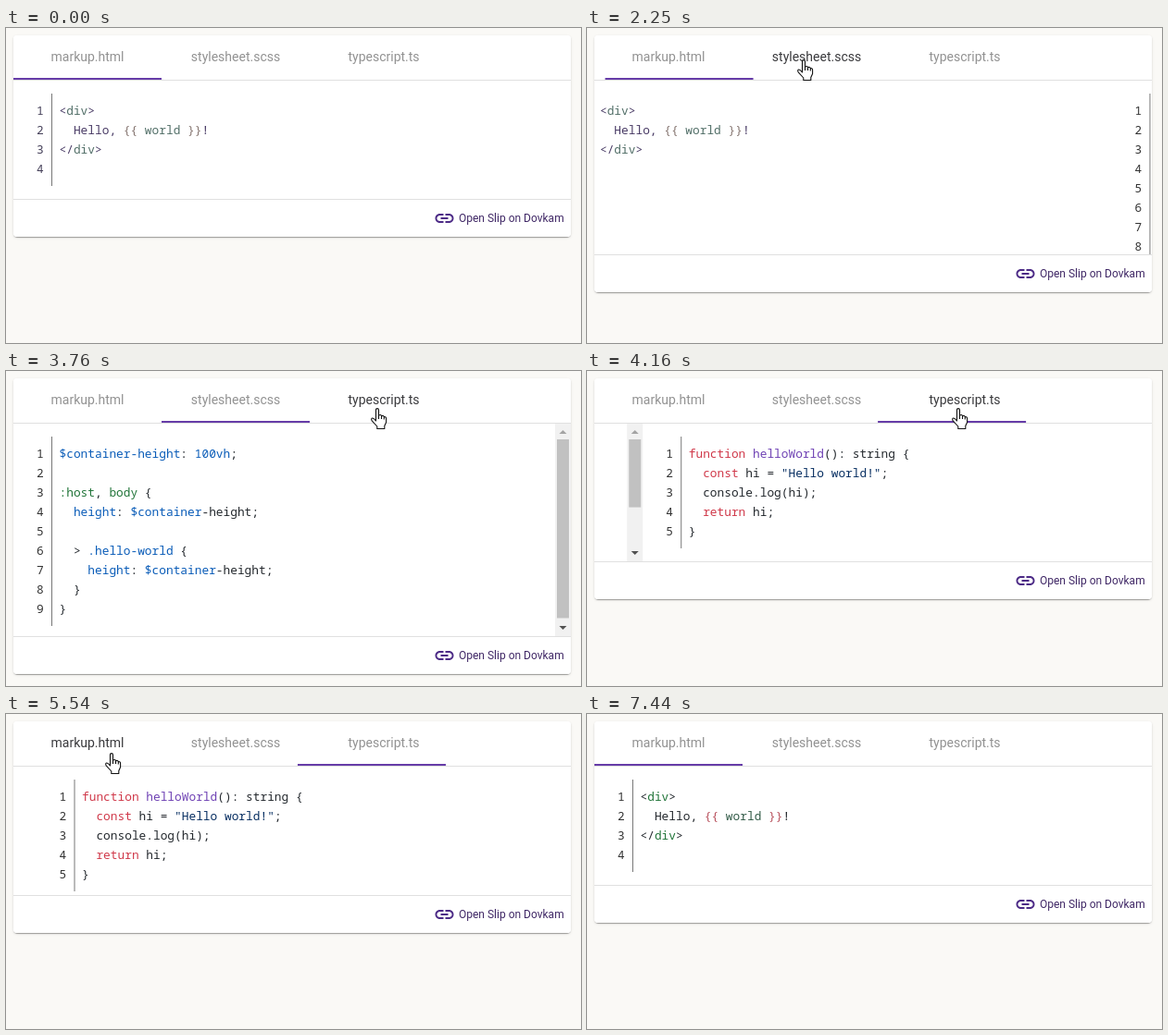
Write an HTML page with a canvas that moves like this. It is 621 by 341 pixels and loops after 7490 ms.

```html
<!DOCTYPE html>
<html lang="en">
<head>
<meta charset="utf-8">
<title>Code tabs</title>
<style>
html, body { margin: 0; width: 100%; height: 100%; overflow: hidden; background: #faf9f6; }
canvas { display: block; }
</style>
</head>
<body>
<canvas id="stage" width="621" height="341"></canvas>
<script>
const ctx = document.getElementById('stage').getContext('2d');
const LOOP = 7490;
const CARD = { x: 8, y: 8, w: 602 };
const TAB_W = 160, BODY_TOP = 57, FOOTER = 41, LINE = 21, BAR = 17;
const CODE_FONT = '12.83px "Noto Sans Mono", monospace';
const UI_FONT = 'Roboto, sans-serif';
const INK = '#663ca8';

// Each token starts with its colour key; "|" separates tokens.
const PANELS = [
  { name: 'markup.html', lines: [
    'd<|gdiv|d>',
    'd  Hello, |b{{|w world |b}}|d!',
    'd</|gdiv|d>',
    ''] },
  { name: 'stylesheet.scss', lines: [
    'c$container-height|d: |c100vh|d;',
    '',
    'g:host|d, |gbody|d {',
    'c  height|d: |c$container|d-height;',
    '',
    'd  > |c.hello-world|d {',
    'c    height|d: |c$container|d-height;',
    'd  }',
    'd}'] },
  { name: 'typescript.ts', lines: [
    'rfunction |phelloWorld|d(): string {',
    'r  const|d hi = |s"Hello world!"|d;',
    'd  console.log(hi);',
    'r  return|d hi;',
    'd}'] }
];
const VIVID = { d: '#24292e', g: '#22753a', b: '#b8505c', w: '#335c48', c: '#0a5cb8', r: '#d0394a', p: '#6f42b4', s: '#082f62', n: '#333' };
const MUTED = { d: '#4a3c66', g: '#526f68', b: '#84746f', w: '#526f68', n: '#46415a' };

const SWITCHES = [
  { at: 2180, from: 0, to: 1 },
  { at: 3827, from: 1, to: 2 },
  { at: 5486, from: 2, to: 0 }
];
const SLIDE = 500, HEIGHT_LEAD = 120, FOCUS_LEAD = 80, BLUR = 7440;

// Pointer hot spot: time, x, y
const PATH = [
  [400, 578, 322], [740, 390, 262], [1080, 195, 192], [1300, 171, 110],
  [1560, 212, 21], [1700, 233, 33], [1830, 233, 34], [2680, 233, 34],
  [3000, 272, 77], [3090, 284, 81], [3300, 365, 60], [3470, 400, 43],
  [3560, 400, 40], [4420, 400, 40], [4740, 270, 90], [5010, 126, 63],
  [5160, 113, 44], [5250, 113, 42], [5990, 113, 42], [6350, 280, 150],
  [6710, 515, 266], [6800, 525, 277], [7030, 560, 336]
];
const POINTER_END = 7030;

const ARROW = new Path2D('M.5.5V16.5L4.2 13 6.8 19 9.2 18 6.7 12.1H11.9Z');
const HAND = new Path2D('M5.5 14V2.2Q5.5.6 7 .6T8.5 2.2V8Q11 6.8 11.5 8.7 13.8 7.8 14.3 9.7 16.6 9.2 16.6 11.5V15.5L14.8 19.5V22.5H6.8V20L1.2 13.8Q0 11.6 1.6 11 2.9 10.6 5.5 14Z');
const KNUCKLES = new Path2D('M8.5 8V12M11.5 8.7V12M14.3 9.7V12.5');
const LINK = new Path2D('M3.9 12c0-1.71 1.39-3.1 3.1-3.1h4V7H7c-2.76 0-5 2.24-5 5s2.24 5 5 5h4v-1.9H7c-1.71 0-3.1-1.39-3.1-3.1zM8 13h8v-2H8v2zM17 7h-4v1.9h4c1.71 0 3.1 1.39 3.1 3.1s-1.39 3.1-3.1 3.1h-4V17h4c2.76 0 5-2.24 5-5s-2.24-5-5-5z');

const mix = (a, b, k) => a + (b - a) * k;
const contentHeight = i => PANELS[i].lines.length * LINE + 44;

// cubic-bezier(.35, 0, .25, 1)
function ease(x) {
  if (x <= 0) return 0;
  if (x >= 1) return 1;
  let lo = 0, hi = 1, s;
  for (let i = 0; i < 24; i++) {
    s = (lo + hi) / 2;
    const q = 1 - s;
    if (3 * q * q * s * .35 + 3 * q * s * s * .25 + s ** 3 < x) lo = s;
    else hi = s;
  }
  return s * s * (3 - 2 * s);
}

// Monotone cubic through the pointer path, so pauses do not overshoot.
function pathSlope(i, axis) {
  if (i < 1 || i > PATH.length - 2) {
    const j = i < 1 ? 0 : i - 1;
    return (PATH[j + 1][axis] - PATH[j][axis]) / (PATH[j + 1][0] - PATH[j][0]);
  }
  const [a, b, c] = PATH.slice(i - 1, i + 2);
  const before = (b[axis] - a[axis]) / (b[0] - a[0]);
  const after = (c[axis] - b[axis]) / (c[0] - b[0]);
  return before * after <= 0 ? 0 : 2 * before * after / (before + after);
}

function pointerAt(t) {
  let i = 0;
  while (i < PATH.length - 2 && t >= PATH[i + 1][0]) i++;
  const a = PATH[i], b = PATH[i + 1], span = b[0] - a[0], k = (t - a[0]) / span;
  return [1, 2].map(axis => {
    const bend = k * (1 - k) * span;
    return mix(a[axis], b[axis], k * k * (3 - 2 * k))
      + bend * ((1 - k) * pathSlope(i, axis) - k * pathSlope(i + 1, axis));
  });
}

function rect(x, y, w, h, color) {
  ctx.fillStyle = color;
  ctx.fillRect(x, y, w, h);
}

function text(str, x, y, color, font, align = 'left') {
  ctx.font = font;
  ctx.textAlign = align;
  ctx.fillStyle = color;
  ctx.fillText(str, x, y);
}

function triangle(x, y, dir, color) {
  ctx.fillStyle = color;
  ctx.beginPath();
  ctx.moveTo(x - 4, y - 2 * dir);
  ctx.lineTo(x + 4, y - 2 * dir);
  ctx.lineTo(x, y + 2 * dir);
  ctx.fill();
}

function drawCard(bottom) {
  const { x, y, w } = CARD, h = bottom - y;
  for (const [dy, blur, spread, alpha] of [[2, 1, -1, .2], [1, 1, 0, .14], [1, 3, 0, .12]]) {
    ctx.save();
    ctx.shadowColor = `rgba(0,0,0,${alpha})`;
    ctx.shadowBlur = blur;
    ctx.shadowOffsetY = dy;
    ctx.fillStyle = '#fff';
    ctx.beginPath();
    ctx.roundRect(x - spread, y - spread, w + 2 * spread, h + 2 * spread, 4);
    ctx.fill();
    ctx.restore();
  }
  ctx.fillStyle = '#fff';
  ctx.beginPath();
  ctx.roundRect(x, y, w, h, 4);
  ctx.fill();
}

function drawScrollbar(right, height, full) {
  const x = right - BAR, mid = x + BAR / 2;
  rect(x, BODY_TOP, BAR, height, '#f1f1f1');
  rect(x + 2, BODY_TOP + BAR, BAR - 4, (height - 2 * BAR) * height / full, '#c1c1c1');
  triangle(mid, BODY_TOP + 9, -1, '#a3a3a3');
  triangle(mid, BODY_TOP + height - 9, 1, '#505050');
}

function drawPanel(index, shift, height, colors) {
  const { lines } = PANELS[index], full = contentHeight(index);
  ctx.save();
  ctx.beginPath();
  ctx.rect(CARD.x, BODY_TOP, CARD.w, height);
  ctx.clip();
  ctx.translate(shift, 0);
  rect(49, 71, 1, lines.length * LINE + 16, '#777');
  lines.forEach((line, row) => {
    const y = 94 + row * LINE;
    text(row + 1, 40.7, y, colors.n, CODE_FONT, 'right');
    let x = 57.5;
    for (const token of line.split('|')) {
      const str = token.slice(1);
      text(str, x, y, colors[token[0]], CODE_FONT);
      x += ctx.measureText(str).width;
    }
  });
  if (height < full - 1) drawScrollbar(CARD.x + CARD.w, height, full);
  ctx.restore();
}

function drawPointer(t) {
  if (t < PATH[0][0] || t >= POINTER_END) return;
  const [x, y] = pointerAt(t).map(Math.round);
  const onTab = x >= 8 && x < 488 && y >= 8 && y < 56;
  ctx.save();
  ctx.translate(onTab ? x - 6 : x, y);
  ctx.fillStyle = '#fff';
  ctx.strokeStyle = '#111';
  ctx.lineWidth = 1.1;
  ctx.lineJoin = 'round';
  const shape = onTab ? HAND : ARROW;
  ctx.fill(shape);
  ctx.stroke(shape);
  if (onTab) ctx.stroke(KNUCKLES);
  ctx.restore();
}

function draw(t) {
  let from = 0, to = 0, slide = 1, grow = 1, focus = -1;
  for (const s of SWITCHES) {
    if (t >= s.at - FOCUS_LEAD) focus = s.to;
    if (t < s.at - HEIGHT_LEAD) continue;
    ({ from, to } = s);
    slide = ease((t - s.at) / SLIDE);
    grow = ease((t - s.at + HEIGHT_LEAD) / SLIDE);
  }
  if (t >= BLUR) focus = -1;

  const height = Math.round(mix(contentHeight(from), contentHeight(to), grow));
  const edge = BODY_TOP + height;
  const dir = Math.sign(to - from);

  rect(0, 0, 621, 341, '#faf9f6');
  drawCard(edge + FOOTER);

  const colorsOf = i => i === 0 && t < 3000 ? MUTED : VIVID;
  if (slide < 1) drawPanel(from, -dir * slide * CARD.w, height, colorsOf(from));
  drawPanel(to, dir * (1 - slide) * CARD.w, height, colorsOf(to));

  rect(CARD.x, 56, CARD.w, 1, '#e0e0e0');
  PANELS.forEach(({ name }, i) =>
    text(name, CARD.x + TAB_W * (i + .5), 36, i === focus ? '#3a3a3d' : '#929292', '14px ' + UI_FONT, 'center'));
  rect(CARD.x + TAB_W * mix(from, to, slide), 54, TAB_W, 2, INK);

  rect(CARD.x, edge, CARD.w, 1, '#e0e0e0');
  ctx.save();
  ctx.translate(461.5, edge + 9);
  ctx.fillStyle = '#4c2a86';
  ctx.fill(LINK);
  ctx.restore();
  text('Open Slip on Dovkam', 489, edge + 25, '#402866', '12px ' + UI_FONT);

  drawPointer(t);
}

const start = performance.now();
function frame() {
  draw((performance.now() - start) % LOOP);
  requestAnimationFrame(frame);
}
frame();
</script>
</body>
</html>
```
